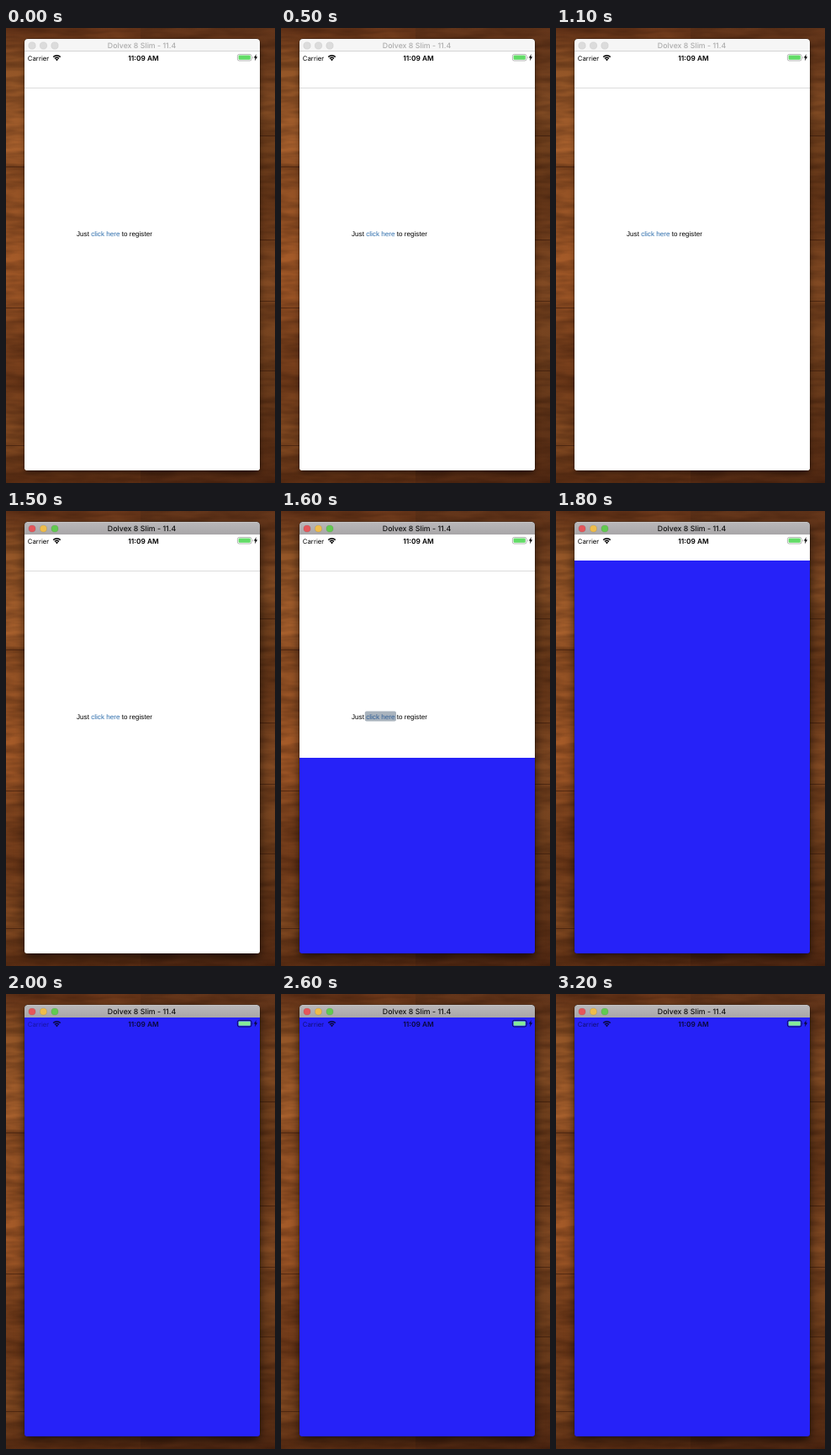
Recreate the animation shown at these times as an HTML page. Size 320 px wide and 542 px high, loop 3.4 s.

```html
<!DOCTYPE html>
<html lang="en">
<head>
<meta charset="utf-8">
<title>Modal link</title>
<style>
  html, body { margin: 0; width: 100%; height: 100%; overflow: hidden; background: #5f3216; }
  svg { display: block; width: 100%; height: 100%; }
  text { font-family: Inter, Roboto, sans-serif; text-rendering: geometricPrecision; white-space: pre; }
  .frame { stroke: #000; stroke-opacity: .45; }
  .idle-shadow { filter: drop-shadow(0 3px 3px rgba(0, 0, 0, .4)); }
  .active-shadow { filter: drop-shadow(0 5px 6px rgba(0, 0, 0, .6)); }
  .title { font-size: 8.8px; font-weight: 500; text-anchor: middle; }
  .message { font: 8.14px "Liberation Sans", Arial, sans-serif; }
  #active, #pressed { opacity: 0; }
</style>
</head>
<body>
<svg viewBox="0 0 320 542" preserveAspectRatio="none">
  <defs>
    <linearGradient id="woodLeft" x2="0" y2="1">
      <stop offset="0" stop-color="#6b371a"/>
      <stop offset=".08" stop-color="#925527"/>
      <stop offset=".28" stop-color="#a8602d"/>
      <stop offset=".31" stop-color="#905024"/>
      <stop offset=".55" stop-color="#a85c29"/>
      <stop offset=".65" stop-color="#864820"/>
      <stop offset=".78" stop-color="#733c1a"/>
      <stop offset=".9" stop-color="#8a4f24"/>
      <stop offset="1" stop-color="#5a2d13"/>
    </linearGradient>
    <linearGradient id="woodRight" x2="0" y2="1">
      <stop offset="0" stop-color="#63351a"/>
      <stop offset=".18" stop-color="#804a23"/>
      <stop offset=".24" stop-color="#70401d"/>
      <stop offset=".4" stop-color="#683819"/>
      <stop offset=".55" stop-color="#824a23"/>
      <stop offset=".75" stop-color="#6f3f1d"/>
      <stop offset="1" stop-color="#542a13"/>
    </linearGradient>
    <linearGradient id="bar" x2="0" y2="1">
      <stop offset="0" stop-color="#bab8ba"/>
      <stop offset="1" stop-color="#a8a6a8"/>
    </linearGradient>
    <filter id="grain" x="0" y="0" width="1" height="1" color-interpolation-filters="sRGB">
      <feTurbulence type="fractalNoise" baseFrequency=".02 .1" numOctaves="3" seed="8"/>
      <feColorMatrix values="0 0 0 0 .14  0 0 0 0 .05  0 0 0 0 .01  .7 0 0 0 -.2"/>
    </filter>
    <clipPath id="screen"><path d="M22 28H302V524q0 3-3 3H25q-3 0-3-3Z"/></clipPath>
  </defs>

  <rect width="160" height="542" fill="url(#woodLeft)"/>
  <rect x="160" width="160" height="542" fill="url(#woodRight)"/>
  <rect width="320" height="542" filter="url(#grain)"/>
  <path d="M0 165.5H22M0 333.5H22M0 497.5H22M302 128.5H320M302 252.5H320M302 325.5H320M302 408.5H320"
        stroke="#2a1006" stroke-opacity=".5"/>

  <g id="idle">
    <rect class="frame idle-shadow" x="22" y="13" width="280" height="514" rx="4"/>
    <rect x="22" y="13" width="280" height="514" rx="4" fill="#f6f6f6"/>
    <path d="M22 27.5H302" stroke="#d5d5d5"/>
    <g fill="#dcdcdc" stroke="#cbcbcb" stroke-width=".6" class="dots"></g>
    <text class="title" x="161.5" y="24.2" fill="#adadad">Dolvex 8 Slim - 11.4</text>
  </g>
  <g id="active">
    <rect class="frame active-shadow" x="22" y="13" width="280" height="514" rx="4"/>
    <path d="M22 28V17q0-4 4-4H298q4 0 4 4V28Z" fill="url(#bar)"/>
    <path d="M25 13.4H299" stroke="#d2d0d2" stroke-width=".7"/>
    <g class="dots lit" stroke="#000" stroke-opacity=".15" stroke-width=".6"></g>
    <text class="title" x="161.5" y="24.2" fill="#111">Dolvex 8 Slim - 11.4</text>
  </g>

  <g clip-path="url(#screen)">
    <rect x="22" y="28" width="280" height="500" fill="#fff"/>
    <path d="M22 71.5H302" stroke="#dcdcdc"/>
    <text class="message" x="84" y="247.7">Just <tspan fill="#2c6cab">click here</tspan> to register</text>
    <g id="pressed">
      <rect x="99.8" y="238.5" width="37.2" height="12" rx="2" fill="#a9b3bd"/>
      <text class="message" x="101.2" y="247.7" fill="#315f96">click here</text>
    </g>
    <rect id="sheet" x="22" y="28" width="280" height="500" fill="#2622f8"/>
    <g id="status" fill="currentColor">
      <text id="carrier" x="25.8" y="38.6" font-size="7.8">Carrier</text>
      <g fill="none" stroke="currentColor" stroke-width="1.5">
        <path d="M56.2 34.5a6.1 6.1 0 0 1 8.6 0M58 36.4a3.6 3.6 0 0 1 5 0"/>
      </g>
      <path d="M60.5 39.2l-1.6-1.6a2.3 2.3 0 0 1 3.2 0Z"/>
      <text x="163.5" y="38.6" font-size="8.4" font-weight="600" text-anchor="middle">11:09 AM</text>
      <rect id="shell" x="275.4" y="31.4" width="16.6" height="7.6" rx="2" fill="none" stroke-width=".7"/>
      <path d="M293 33.8q1.2 1.4 0 2.8Z" fill-opacity=".5"/>
      <rect id="charge" x="276.6" y="32.6" width="14.2" height="5.2" rx="1" fill="#62dc67"/>
      <path d="M297.8 31l-3 4.6h1.8l-.7 3.6 3.2-4.9h-1.9Z"/>
    </g>
  </g>
</svg>
<script>
  const LOOP = 3400;
  const byId = id => document.getElementById(id);

  document.querySelectorAll('.dots').forEach(group => {
    const lit = group.classList.contains('lit');
    group.innerHTML = ['#e4565a', '#efbc4a', '#62c950'].map((color, i) =>
      `<circle cx="${31 + i * 13.5}" cy="21" r="4.1" ${lit ? `fill="${color}"` : ''}/>`).join('');
  });

  // Each step is [time in ms, value], held until the next step.
  function hold(id, property, steps) {
    const frames = steps.map(([time, value]) =>
      ({ offset: time / LOOP, [property]: value, easing: 'steps(1, end)' }));
    frames.push({ offset: 1, [property]: steps[steps.length - 1][1] });
    byId(id).animate(frames, { duration: LOOP, iterations: Infinity });
  }

  // Critically damped rise of the sheet, sampled at the screen's ten steps a second.
  const rise = [0, 1, 2, 3].map(i => {
    const phase = 1.575 + 1.455 * i;
    const rest = (1 + phase) * Math.exp(-phase);
    return [1600 + 100 * i, `translateY(${Math.round(rest * 499)}px)`];
  });

  hold('sheet', 'transform', [[0, 'translateY(500px)'], ...rise, [2000, 'translateY(0px)']]);
  hold('idle', 'opacity', [[0, 1], [1500, 0]]);
  hold('active', 'opacity', [[0, 0], [1500, 1]]);
  hold('pressed', 'opacity', [[0, 0], [1600, 1], [1700, 0]]);
  hold('status', 'color', [[0, '#000'], [2000, '#09083c']]);
  hold('carrier', 'opacity', [[0, 1], [2000, .45], [2100, .7]]);
  hold('shell', 'stroke', [[0, '#999'], [2000, '#050520']]);
  hold('charge', 'fill', [[0, '#62dc67'], [2000, '#86eb98']]);
</script>
</body>
</html>
```
